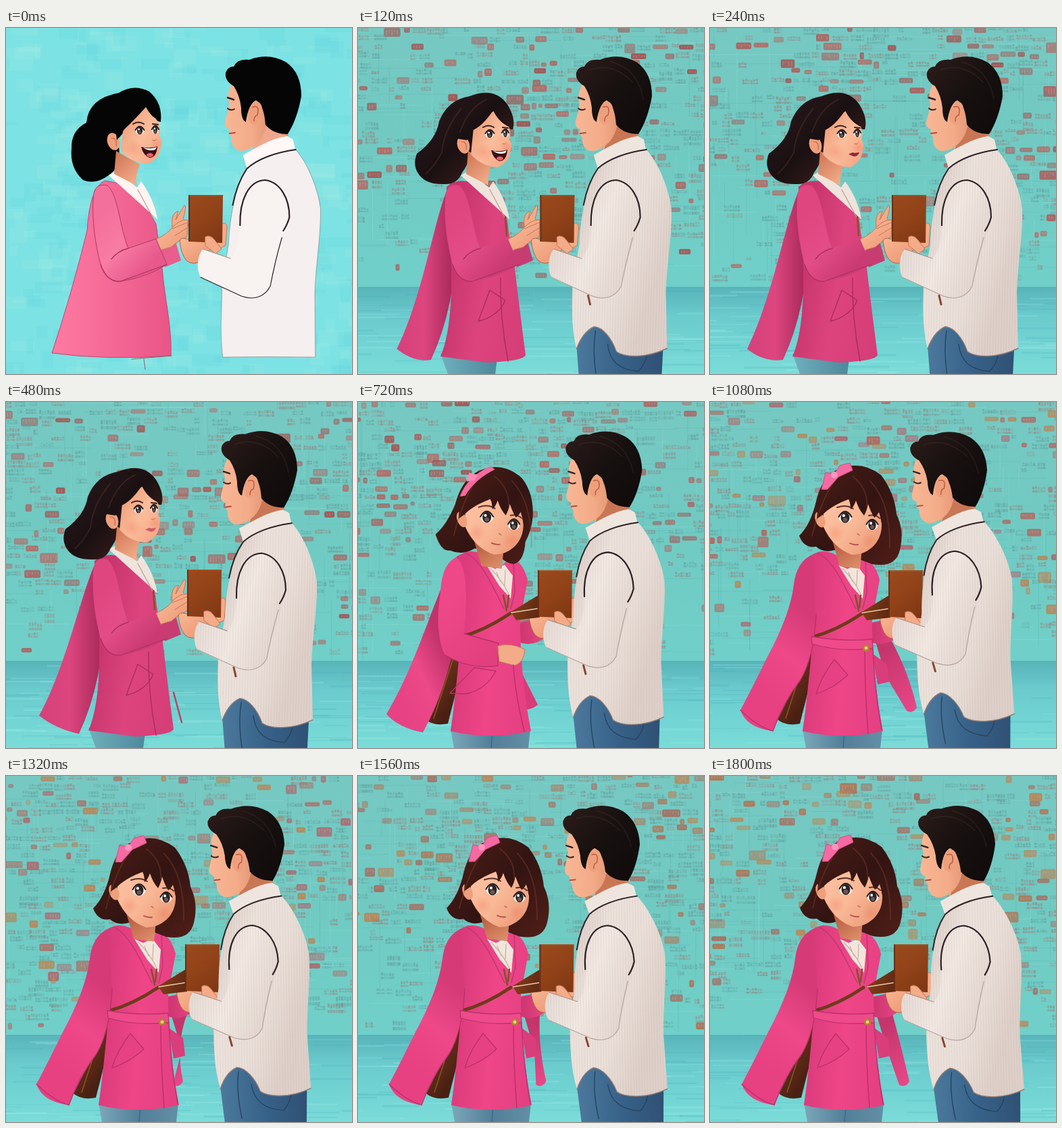
Write an HTML page with a canvas that moves like this. It is 512 px wide and 512 px high and loops after 1.92 s.

```html
<!DOCTYPE html>
<html lang="en">
<head>
<meta charset="utf-8">
<title>The book</title>
<style>
html, body { margin: 0; width: 100%; height: 100%; overflow: hidden; }
canvas { display: block; width: 512px; height: 512px; }
</style>
</head>
<body>
<canvas id="stage" width="512" height="512"></canvas>
<script>
const ctx = document.getElementById('stage').getContext('2d');
const STEP = 120, STEPS = 16;
const KEYS = [0, 2, 4, 7, 9, 11, 15];

// Linear interpolation of a value through the key steps.
function track(k, values) {
  let i = 0;
  while (i < KEYS.length - 2 && k > KEYS[i + 1]) i++;
  const u = (k - KEYS[i]) / (KEYS[i + 1] - KEYS[i]);
  return values[i] + (values[i + 1] - values[i]) * u;
}

function rng(seed) {
  let s = seed * 7919 + 17;
  return () => {
    s = (s + 0x6D2B79F5) | 0;
    let t = Math.imul(s ^ (s >>> 15), 1 | s);
    t ^= t + Math.imul(t ^ (t >>> 7), 61 | t);
    return ((t ^ (t >>> 14)) >>> 0) / 4294967296;
  };
}

function shape(d, fill, stroke, width = 1) {
  const p = new Path2D(d);
  if (fill) { ctx.fillStyle = fill; ctx.fill(p); }
  if (stroke) line(d, stroke, width);
}

function line(d, color, width = 1) {
  ctx.strokeStyle = color;
  ctx.lineWidth = width;
  ctx.stroke(new Path2D(d));
}

function oval(x, y, rx, ry, fill, turn = 0) {
  ctx.fillStyle = fill;
  ctx.beginPath();
  ctx.ellipse(x, y, rx, ry, turn, 0, Math.PI * 2);
  ctx.fill();
}

function grad(x0, y0, x1, y1, ...colors) {
  const g = ctx.createLinearGradient(x0, y0, x1, y1);
  colors.forEach((c, i) => g.addColorStop(i / (colors.length - 1), c));
  return g;
}

function blush(x, y, r) {
  const g = ctx.createRadialGradient(x, y, 0, x, y, r);
  g.addColorStop(0, 'rgba(236,100,75,.25)');
  g.addColorStop(1, 'rgba(236,100,75,0)');
  oval(x, y, r, r, g);
}

function shifted(dx, dy, draw) {
  ctx.save();
  ctx.translate(dx, dy);
  draw();
  ctx.restore();
}

// ---------- background ----------
function paleWall() {
  const rand = rng(3);
  ctx.fillStyle = '#7ce2e3';
  ctx.fillRect(0, 0, 512, 512);
  for (let i = 0; i < 420; i++) {
    ctx.fillStyle = rand() < .5 ? 'rgba(90,205,215,.16)' : 'rgba(165,235,222,.2)';
    ctx.fillRect(rand() * 520 - 10, rand() * 520 - 10, 8 + rand() * 38, 4 + rand() * 22);
  }
}

function wall(k) {
  const rand = rng(k + 40);
  ctx.fillStyle = grad(0, 0, 0, 384, '#76c9c2', '#70cac2', '#70d0c9');
  ctx.fillRect(0, 0, 512, 384);
  for (let i = 0; i < 110; i++) {
    ctx.fillStyle = rand() < .5 ? 'rgba(60,155,155,.18)' : 'rgba(165,235,225,.22)';
    if (rand() < .5) ctx.fillRect(rand() * 512 - 40, rand() * 370, 40 + rand() * 120, 1);
    else ctx.fillRect(rand() * 512, rand() * 300, 1, 30 + rand() * 90);
  }
  const tones = k > 12 ? ['#b0704f', '#b98455', '#a5695c'] :
    k > 7 ? ['#b0645c', '#ad626a', '#b48658'] : ['#ae5a59', '#b46661', '#a2504f'];
  for (let row = 0; row < 30; row++) {
    const base = row * 12.6 - 4;
    for (let x = rand() * 18 - 14; x < 512;) {
      const big = rand() < .12;
      const w = big ? 14 + rand() * 13 : 6 + rand() * 17;
      const h = big ? 10 + rand() * 6 : 6 + rand() * 5;
      const y = base + rand() * 5;
      const cluster = Math.sin(x / 47 + k * 2.3) + Math.sin(y / 38 + k * 1.7 + x / 90);
      const density = .62 + cluster * .13 - Math.max(0, y - 190) / 480;
      const pick = rand();
      const bold = pick < density * (y < 230 ? .3 : .16);
      if (bold) {
        ctx.globalAlpha = .45 + rand() * .45;
        ctx.fillStyle = tones[Math.floor(rand() * 3)];
        ctx.beginPath();
        ctx.roundRect(x, y, w, h, 2.5);
        ctx.fill();
        ctx.globalAlpha = .25;
        ctx.fillStyle = '#ddb0a2';
        for (let gx = x + 3; gx < x + w - 3; gx += 4) ctx.fillRect(gx, y + 3, 2, 1 + rand() * (h - 6));
      } else if (pick < density) {
        ctx.fillStyle = rand() < .45 ? '#a0706e' : '#5f9290';
        for (let gx = x; gx < x + w; gx += 4) {
          ctx.globalAlpha = .18 + rand() * .35;
          ctx.fillRect(gx, y + rand() * 2, 3, h * .4);
          ctx.fillRect(gx, y + h * .65, 3.5, h * .3);
        }
      }
      x += w + 2 + rand() * 6;
    }
  }
  ctx.globalAlpha = 1;
  ctx.fillStyle = grad(0, 383, 0, 512, '#58b4b9', '#6bcbcd', '#72d4d3', '#7bdcd8');
  ctx.fillRect(0, 383, 512, 129);
  for (let i = 0; i < 75; i++) {
    ctx.fillStyle = rand() < .5 ? 'rgba(60,165,178,.2)' : 'rgba(170,240,235,.22)';
    ctx.fillRect(rand() * 560 - 60, 388 + rand() * 124, 30 + rand() * 110, 1 + rand() * 2);
  }
}

// ---------- man ----------
const SKIN = '#f3ab88', SKIN_DARK = '#c97655', INK = '#2c2023';

function manBody(flat) {
  if (!flat) {
    shape('M322 470L332 436H452L447 535H327Z', grad(325, 0, 452, 0, '#4a789b', '#376188', '#2f5073'));
    line('M368 468C371 494 386 506 414 508Q424 497 426 484M350 448Q345 480 352 520', '#264460', 1.4);
  }
  const hem = flat ? 'L455 487Q380 486 318 487C312 440 318 410 316 380'
    : 'L456 474C425 489 394 488 381 479C374 459 361 443 348 442C335 448 327 461 322 475C314 442 315 410 316 380';
  const torso = `M352 207C375 188 405 178 424 179C443 199 459 240 462 268C463 310 455 350 454 392${hem}L326 320C328 272 338 232 352 207Z`;
  shape(torso, flat ? '#f5efef' : grad(315, 250, 465, 300, '#d9cac4', '#ece2dc', '#eae0d9', '#ded0c9'));
  if (flat) line(torso, 'rgba(70,50,50,.35)');
  else line('M456 474C425 489 394 488 381 479C374 459 361 443 348 442C335 448 327 461 322 475', '#8d7973', 1.4);
  shape('M347 188C366 178 388 163 412 160L421 165L424 179Q382 185 353 208Z', flat ? '#fff8f7' : '#efe5df');
  line('M425 180C395 184 368 194 353 208Q338 230 332 262', INK, 2);
  const sleeve = 'M343 292C342 255 355 226 380 225C402 228 416 252 416 280C407 318 395 350 388 382C380 398 364 403 346 397L285 369C278 356 280 337 288 327L329 341Q342 330 343 292Z';
  shape(sleeve, flat ? '#f8f2f1' : grad(300, 290, 405, 330, '#e6dad5', '#f2e9e3', '#e4d8d1'));
  if (!flat) {
    ctx.save();
    const clip = new Path2D(torso);
    clip.addPath(new Path2D(sleeve));
    ctx.clip(clip);
    for (let x = 270; x < 475; x += 4) line(`M${x} 180L${x - 8} 490`, 'rgba(130,100,95,.1)', 1);
    ctx.restore();
  }
  line('M388 382C380 398 364 403 346 397L285 369M405 310Q395 345 388 382', flat ? INK : '#b5a29d', 1.2);
  line('M343 292C342 255 355 226 380 225C402 228 416 252 416 280Q413 291 407 300', INK, 2.2);
  line('M288 327L329 341', '#a9918b', 1.2);
  if (!flat) line('M339 396L342 409', '#85452f', 3);
}

function manHead(flat) {
  shape('M333 78C324 90 323 104 326 112C325 125 319 136 320 143Q321 148 327 150L326 156L330 162C329 174 335 182 345 182Q356 181 362 175L361 183Q385 164 414 160L397 105Z',
    grad(320, 130, 400, 130, '#f8b795', SKIN, '#dd8b69'));
  shape('M364 174Q378 164 382 142Q391 156 413 159Q382 166 361 184Z', flat ? '#f0a78c' : SKIN_DARK);
  const hair = 'M333 86Q319 78 321 66Q324 57 333 57Q338 45 356 47Q385 36 411 51Q433 67 433 101Q427 135 413 157Q391 157 380 143Q378 114 366 107Q355 112 351 139Q344 136 344 118Q342 100 333 86Z';
  shape(hair, flat ? '#050505' : grad(330, 50, 430, 140, '#2a1b19', '#16100f', '#110b0c'));
  if (!flat) line('M341 62Q375 50 404 80M372 50Q412 60 420 105', 'rgba(115,80,70,.16)', 2);
  oval(365, 126, 10, 17, '#eea07d', .2);
  line('M361 117Q372 113 368 129Q363 130 363 138', '#b95d42', 1.5);
  line('M324 103L333 106', INK, 2.4);
  line('M324 119Q329 123 334 120', INK, 2);
  line('M327 156L335 155', '#b04a42', 2);
}

function man(k, flat) {
  const top = track(k, [4, 0, -2, -18, -23, -21, -11]);
  const bottom = track(k, [3, 0, -2, -7, -9, -8, 5]);
  const tall = track(k, [1, 1, .99, .973, .966, .968, .972]);
  const shear = (bottom - top) / 300;
  ctx.save();
  ctx.transform(1, 0, shear, tall, top - 100 * shear, 100 * (1 - tall));
  manHead(flat);
  manBody(flat);
  ctx.restore();
}

function bookAndHand(k, open) {
  shifted(track(k, [1, 0, -1, -4, -5, -4, 3]), track(k, [0, 0, 1, 2, 2, 2, 2]), () => {
    shape('M314 296Q323 282 326 294L324 322L306 330Z', SKIN, SKIN_DARK);
    shape('M256 315Q258 309 266 312L300 316L314 325Q297 325 287 345Q276 352 266 344Q258 335 256 315Z',
      grad(260, 310, 290, 350, '#f8b794', '#ec9672'), '#b3654a');
    if (open) {
      shape('M229 309L270 284L272 317L237 321Z', grad(230, 300, 270, 310, '#853f19', '#5e2913'));
      line('M230 310L268 304', '#e9c9ac', 1.6);
    }
    shape('M269 247H320L319 318L269 316Z', grad(269, 250, 320, 315, '#9a4a1c', '#914218', '#7d3714'));
    line('M270 248V315', '#6b2e14', 2);
    line('M271 248H320', '#ae5a27', 1.2);
    shape('M294 309Q301 305 308 314L318 327L309 334L294 322Z', SKIN, SKIN_DARK);
  });
}

// ---------- woman ----------
const eye = (x, y, rx, ry) => {
  oval(x, y, rx + 1, ry, '#fff5ef');
  oval(x, y, rx * .76, ry, '#2a2223');
  oval(x, y + ry * .4, rx * .4, ry * .4, '#6b5651');
  oval(x - rx * .25, y - ry * .35, rx * .25, ry * .27, '#fff');
  line(`M${x - rx - 1} ${y - 1}Q${x} ${y - ry * 2.1} ${x + rx + 1} ${y - 1}`, '#211719', 2);
};

function sideHead(flat, smile, calm) {
  const hairFill = flat ? '#050505' : grad(100, 110, 210, 220, '#28181a', '#1a1012', '#42211c');
  const back = flat
    ? 'M167 96Q189 82 212 94Q232 111 229 139L195 130L165 165Q172 192 160 211Q136 234 114 225Q94 207 97 178Q96 152 119 140Q122 104 167 96Z'
    : 'M165 101Q202 86 221 113Q234 134 229 150L176 148Q170 193 154 214Q147 232 128 231Q102 232 91 218Q80 204 87 186Q116 165 120 138Q133 106 165 101Z';
  shape(back, hairFill);
  shape('M163 182L198 202Q191 218 193 233L160 216Z', grad(165, 190, 195, 225, '#d27c5a', SKIN));
  shifted(flat ? 3 : 0, flat ? -5 : 0, () => {
    shape('M172 138L205 121L223 145Q227 156 224 165Q229 172 226 180Q225 198 207 206Q183 205 167 187Z',
      grad(170, 150, 227, 185, '#f0a17d', '#fabd9b', '#f5a888'));
    oval(156, 173, 9, 13, '#eea07d', -.3);
    line('M153 168Q162 168 160 180', '#c0654a', 1.2);
    blush(186, 184, 14);
    blush(220, 177, 10);
    eye(195, 157, 5.5, 5.5);
    eye(218, 156, 4, 5.5);
    line('M185 147Q193 142 201 147M214 147L222 148', '#35201f', 2);
    line('M214 171Q217 173 219 170', '#cf7d65', 1.3);
    if (smile) {
      shape('M197 181Q211 184 221 180Q220 197 209 197Q200 193 197 181Z', '#3b1013');
      shape('M200 182Q212 185 220 181L218 185Q208 188 200 182Z', '#fff');
      oval(210, 193, 5, 3, '#e66167');
    } else shape('M205 187Q211 183 214 185L221 184Q219 190 213 190Z', calm ? '#cf5c68' : '#8c2b34');
  });
  shape(flat ? 'M158 112L205 98L229 138Q215 133 207 117Q189 137 175 150L164 166Z'
    : 'M155 110L202 98L230 149Q209 142 200 122Q184 146 168 152L161 166L148 164Z', hairFill);
  if (!flat) line('M153 119Q127 150 124 184Q113 205 101 215M190 106Q164 117 151 154', 'rgba(130,75,60,.25)', 2);
}

function sideBody(k, flat) {
  const left = track(k, [60, 55, 49, 42, 42, 42, 42]);
  const low = track(k, [475, 475, 464, 462, 462, 462, 462]);
  if (flat) {
    shape('M146 226Q124 236 120 300Q98 390 68 481Q150 492 244 485C246 445 234 395 231 355L222 290L192 235Z',
      grad(70, 350, 240, 350, '#ff7aa2', '#f46996', '#e95687'), '#c54370');
    line('M186 490L245 485M204 490L206 505', '#81676d', 1);
  } else {
    shape('M122 482H207L203 512H133Z', grad(125, 0, 205, 0, '#6faebb', '#4d899d'));
    shape(`M138 228C116 260 ${left + 42} 390 ${left} ${low}Q${left + 25} ${low + 20} 108 491Q144 414 146 310Z`,
      grad(left, 400, 138, 400, '#d5417a', '#dd467f', '#ac2b5c'));
    shape('M131 235Q154 216 190 238Q220 252 223 302L232 355Q239 416 248 484Q245 493 190 495L122 486Q140 445 138 350Z',
      grad(125, 380, 250, 400, '#c5346a', '#dd447e', '#d63e78'));
    line('M211 370Q210 430 222 493M178 434L195 388L218 403Q207 427 178 434', '#a92d5e', 1.4);
    line('M203 359L231 350', '#4f2927', 5);
  }
  shape('M152 218L163 212L194 236L200 227Q219 253 224 283Z', flat ? '#fff4f1' : '#efe4dc');
  line('M195 239L217 280', '#b99c94', 1.2);
  if (!flat) line('M218 280L220 307', '#855225', 2.5);
  shape('M229 327L251 316L259 344L235 354Z', flat ? '#e85e8d' : '#c83d71');
  shape('M247 300Q242 274 255 271L251 284L264 262Q268 263 262 282L270 291L263 310Z', SKIN, SKIN_DARK);
  shape('M221 313Q238 306 247 294Q258 283 269 284L268 309Q253 316 245 324L228 329Z', grad(230, 290, 260, 325, '#f8b998', '#ee9b78'), SKIN_DARK);
  line('M246 297L268 288M250 307L268 296', SKIN_DARK, 1);
  shape('M129 252Q130 228 150 233C167 248 168 296 181 326L222 312L238 350Q208 369 169 375Q149 376 140 350C132 320 127 285 129 252Z',
    flat ? grad(130, 290, 205, 360, '#f4709c', '#f87ca3', '#e7588b') : grad(130, 290, 205, 360, '#df4680', '#e34d87', '#cb3b73'),
    flat ? '#ac3d62' : null);
  line('M181 326Q165 330 156 342M140 350Q149 376 169 375L238 350', '#ad315f', 1.3);
  if (k > 3 && k < 6) line('M248 430L260 474', '#b84460', 2.5);
}

function frontHead(band) {
  const hairFill = grad(145, 110, 275, 230, '#4a1d16', '#321412', '#4d1d17');
  const hair = band
    ? 'M183 104Q220 84 252 112Q270 135 268 170Q266 190 257 206Q255 235 240 239Q225 238 210 218L182 216Q163 227 146 219Q132 221 124 195Q140 182 153 151Q162 117 183 104Z'
    : 'M183 102Q220 82 253 107Q273 133 276 165Q288 190 281 218Q275 245 240 239L185 218Q168 223 157 213Q139 216 132 197Q149 180 157 146Q164 115 183 102Z';
  shape(hair, hairFill);
  shape('M181 204L225 216L222 246L192 242Z', grad(188, 205, 215, 245, '#b65b3f', '#dc8d69'));
  shape('M168 158Q186 124 225 133Q249 146 254 178Q255 200 240 214Q226 226 210 225Q182 215 168 184Z',
    grad(170, 150, 250, 210, '#fcc0a0', '#f9b896', '#ec9a78'));
  oval(163, 173, 7, 12, '#eea07d', -.35);
  blush(185, 193, 14);
  blush(236, 204, 12);
  eye(200, 170, 8.5, 8);
  eye(240, 181, 7.5, 7.5);
  line('M188 155Q202 150 212 157M235 167Q245 165 251 171', '#5b3028', 2);
  line('M218 194L221 196', '#c9765d', 1.6);
  line('M207 208Q213 211 219 210', '#b5504e', 1.9);
  shape('M158 172Q160 119 196 108L244 113Q268 142 260 196Q253 182 251 160Q247 168 243 170Q238 162 234 150Q232 160 228 167Q220 158 216 145Q213 154 208 158Q208 148 205 143Q186 150 173 160Q166 167 158 172Z', hairFill);
  line('M185 115Q165 142 151 197M211 109Q234 127 232 153M237 116Q267 147 266 214', 'rgba(150,80,58,.3)', 2);
  if (band) {
    shape('M160 139Q170 111 205 94L212 99Q183 113 168 138Z', '#f36a9f');
    shape('M170 117L174 104L187 107L182 115Z', '#f98bb4');
  } else {
    shape('M165 128L171 103L184 106L192 93L207 89L211 100L190 110L174 128Z', '#f56aa2', '#d84a80');
    oval(184, 107, 5, 5, '#fb95bc');
  }
}

function frontBody(k, turning) {
  shape('M137 484H255L252 512H142Z', grad(140, 0, 255, 0, '#79a6b7', '#527f99', '#638fa5'));
  line('M199 488L197 512', '#416a84', 1.5);
  shape('M151 355Q132 377 125 420L100 470Q112 480 133 476L151 405Z', grad(105, 400, 150, 430, '#74391a', '#4a2013'));
  line('M142 376L112 468', '#8d5329', 1.5);
  const seam = '#b9316b';
  if (turning) shape('M232 380L266 448Q257 456 244 455Z', '#d93a78');
  else {
    const reach = track(k, [0, 0, 0, 265, 306, 262, 293]);
    shape(`M242 345L268 352Q${reach - 12} 400 ${reach} 452Q${reach - 6} 462 ${reach - 15} 457L260 405Z`,
      grad(240, 380, reach, 450, '#c4356c', '#e74786'));
    shape('M240 372L262 388L265 414L248 418Z', '#d93d7a');
  }
  shape('M232 328L270 320L276 349Q260 362 240 356Z', grad(235, 0, 276, 0, '#c9346d', '#e64583'));
  shape('M132 246Q138 230 160 222Q178 218 194 232L210 246L224 230Q244 235 251 263L240 322Q240 405 256 487Q195 501 137 487Q145 430 151 360Z',
    grad(140, 360, 255, 370, '#d93a79', '#ee4687', '#e54082'));
  line('M160 224Q180 232 204 282L216 306M230 234L232 282L226 306', '#c13870', 1.6);
  shape('M190 241L203 247L217 241L229 257L226 291L209 272Z', '#f2e6dc');
  line('M196 246Q214 265 223 284M205 252L211 266M218 249L217 271', '#cbb5a9', 1.4);
  line('M215 286L220 309M223 286L221 304', '#80512c', 2.5);
  line('M151 348Q188 338 225 313', '#6f3a1b', 5);
  if (turning) {
    shape('M148 228C120 262 92 380 42 462Q60 482 96 489Q132 424 146 340Z', grad(55, 430, 140, 390, '#e74283', '#ec4988', '#c1336a'));
    shape('M122 282Q124 238 146 230Q166 246 157 343L208 357L207 390Q166 397 128 374Q113 340 122 282Z',
      grad(125, 300, 200, 375, '#ee4888', '#e23f7e'));
    line('M157 343L208 357L207 390Q166 397 128 374', seam, 1.3);
    shape('M207 361Q224 355 247 366Q246 385 232 390L209 384Z', SKIN, SKIN_DARK);
    line('M136 431L172 393L204 398Q190 425 160 432Z', seam, 1.4);
    line('M230 389Q232 430 246 487', seam, 1.4);
    return;
  }
  shape('M152 226Q128 236 124 270Q119 314 84 379Q64 420 45 456Q54 482 93 487Q108 445 134 411Q154 377 157 315Z',
    grad(70, 420, 150, 320, '#e74182', '#ee4889', '#d63b77'));
  line('M93 487Q108 445 134 411Q154 377 157 315M45 456Q70 480 93 487', seam, 1.3);
  shape('M150 347Q197 355 240 351L241 365Q190 370 151 358Z', '#ef4a8a', seam, 1.3);
  shape('M157 432Q164 407 184 381L204 404Q184 423 157 432Z', '#e64283', seam, 1.3);
  line('M229 367Q229 425 234 491M241 365Q244 430 254 485', seam, 1.4);
  oval(231, 364, 5.5, 5.5, '#b77a38');
  oval(231, 364, 2.5, 2.5, '#efcb76');
}

function woman(k, flat) {
  if (k < 6) {
    sideBody(k, flat);
    shifted(track(k, [0, 0, 1, 3, 3, 3, 3]), track(k, [0, 0, 2, 4, 4, 4, 4]),
      () => sideHead(flat, k < 2, k > 2));
    return;
  }
  const turning = k < 8;
  shifted(track(k, [0, 0, 0, 0, 0, 0, 2]), 0, () => frontBody(k, turning));
  shifted(track(k, [-10, -10, -10, -9, 0, -3, 1]), track(k, [0, 0, 0, 1, 1, -1, -2]),
    () => frontHead(turning));
}

function draw(k) {
  const flat = k === 0;
  ctx.lineCap = ctx.lineJoin = 'round';
  if (flat) paleWall(); else wall(k);
  woman(k, flat);
  bookAndHand(k, k > 5);
  man(k, flat);
}

let shown = -1;
function tick() {
  const k = Math.floor(performance.now() / STEP) % STEPS;
  if (k !== shown) draw(shown = k);
  requestAnimationFrame(tick);
}
tick();
</script>
</body>
</html>
```
